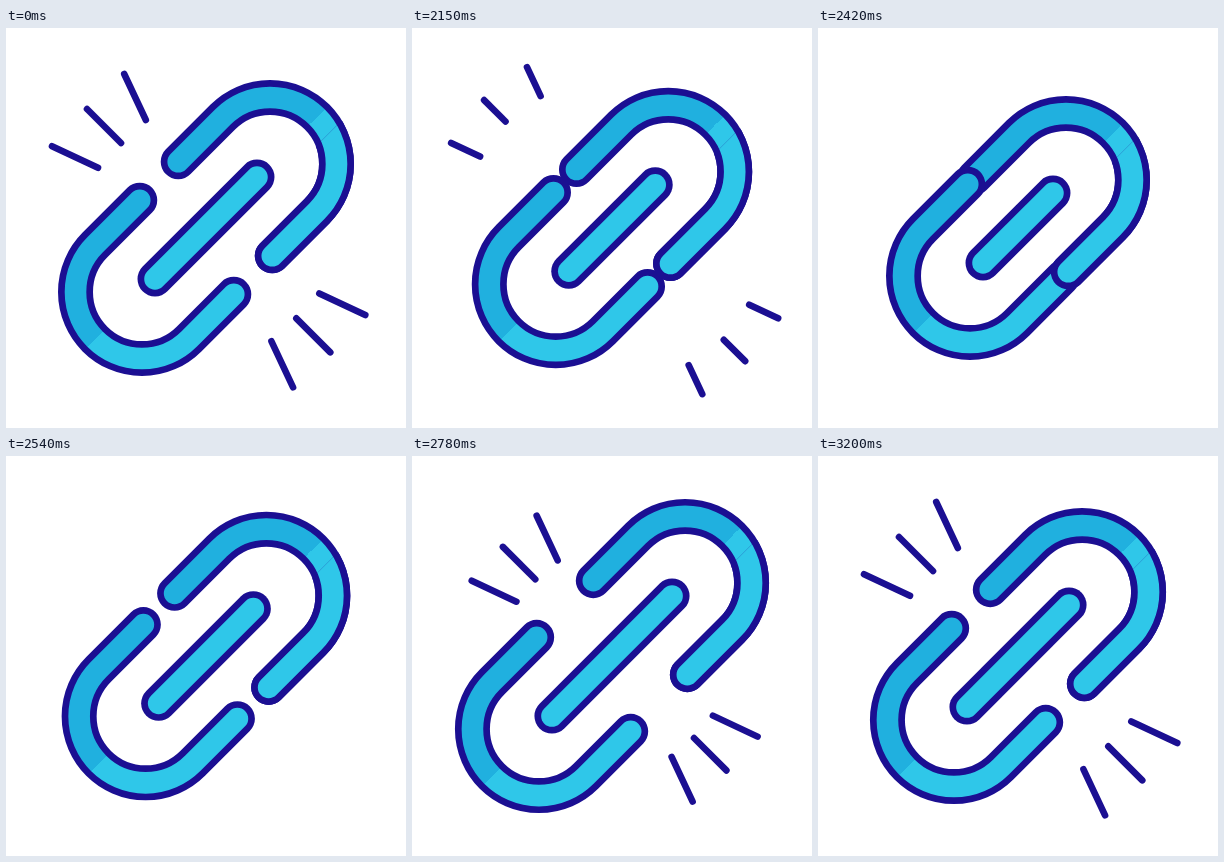
Animation of 400 by 400 pixels, one loop 3230 ms. Source, as an HTML page with a canvas:

```html
<!DOCTYPE html>
<html>
<head>
<meta charset="utf-8">
<style>
  html, body { margin: 0; overflow: hidden; background: #fff; }
  canvas { display: block; }
</style>
</head>
<body>
<canvas id="stage" width="400" height="400"></canvas>
<script>
const ctx = document.getElementById('stage').getContext('2d');
const LOOP = 3230, FRAME = 30, REST_END = 2000;
const INK = '#1b0f92', LIGHT = '#2fc7e9', SHADE = '#20b0df';
const BEND = 66.5, BEND_AT = 90.5, LINK_END = 27.2, BAR_END = 72.1;

// Horizontal positions along a ray: vanishing tip, outer and inner rest ends, origin.
const SIDE = { tip: 27.5, outer: 46, inner: 92, origin: 107, y: x => 96.6 + 0.47 * x };
const MIDDLE = { tip: 57, outer: 81, inner: 115, origin: 125, y: x => x };

const progress = (t, from, to) => Math.min(1, Math.max(0, (t - from) / (to - from)));
const easeInOut = p => (1 - Math.cos(Math.PI * p)) / 2;
const easeOut = p => 1 - (1 - p) ** 3.3;
const mix = (a, b, p) => a + (b - a) * p;

// Outward shift of the parts along the diagonal, in horizontal pixels.
function spread(t) {
  if (t < 2340) return mix(0, -19, easeInOut(progress(t, REST_END, 2340)));
  if (t < 2720) return mix(-19, 9.4, easeInOut(progress(t, 2340, 2720)));
  return mix(9.4, 0, easeInOut(progress(t, 2720, LOOP)));
}

function tube(path, fill) {
  for (const [color, width] of [[INK, 35], [fill, 21.6]]) {
    ctx.strokeStyle = color;
    ctx.lineWidth = width;
    ctx.stroke(path);
  }
}

function link(side, shift, fill) {
  const path = new Path2D();
  const end = side * (LINK_END + shift), bend = side * (BEND_AT + shift);
  path.moveTo(end, -BEND);
  path.lineTo(bend, -BEND);
  path.arc(bend, 0, BEND, -Math.PI / 2, Math.PI / 2, side < 0);
  path.lineTo(end, BEND);
  tube(path, fill);
}

function drawChain(shift) {
  ctx.save();
  ctx.translate(200, 200);
  ctx.rotate(-Math.PI / 4);

  const twoTone = ctx.createLinearGradient(0, -1, 0, 1);
  twoTone.addColorStop(0.5, SHADE);
  twoTone.addColorStop(0.5, LIGHT);

  const bar = new Path2D();
  bar.moveTo(-BAR_END - shift, 0);
  bar.lineTo(BAR_END + shift, 0);
  tube(bar, LIGHT);

  link(1, shift, twoTone);
  link(-1, shift, twoTone);
  // The right link lies on top at its lower end only.
  ctx.beginPath();
  ctx.rect(-200, 20, 400, 200);
  ctx.clip();
  link(1, shift, twoTone);
  ctx.restore();
}

function rayEnds(ray, t) {
  if (t < 2360) {
    const p = easeInOut(progress(t, REST_END, 2360));
    return [mix(ray.outer, ray.tip, p), mix(ray.inner, ray.tip, p)];
  }
  return [
    mix(ray.origin, ray.outer, easeOut(progress(t, 2540, 3200))),
    mix(ray.origin, ray.inner, easeInOut(progress(t, 2660, 3100)))
  ];
}

function drawRays(t) {
  if (t >= 2360 && t <= 2545) return;
  ctx.strokeStyle = INK;
  ctx.lineWidth = 6.6;
  const place = (ray, swap) => {
    ctx.beginPath();
    for (const x of rayEnds(ray, t)) {
      const y = ray.y(x);
      ctx.lineTo(...(swap ? [y, x] : [x, y]));
    }
    ctx.stroke();
  };
  for (const side of [1, -1]) {
    const origin = side < 0 ? 405.3 : 0;
    ctx.setTransform(side, 0, 0, side, origin, origin);
    place(SIDE);
    place(MIDDLE);
    place(SIDE, true);
  }
  ctx.resetTransform();
}

function draw(now) {
  const t = Math.floor((now % LOOP - REST_END) / FRAME) * FRAME + REST_END;
  ctx.fillStyle = '#fff';
  ctx.fillRect(0, 0, 400, 400);
  ctx.lineCap = 'round';
  drawChain(spread(t) * Math.SQRT2);
  drawRays(t);
}

const start = performance.now();
function tick() {
  draw(performance.now() - start);
  requestAnimationFrame(tick);
}
tick();
</script>
</body>
</html>
```
